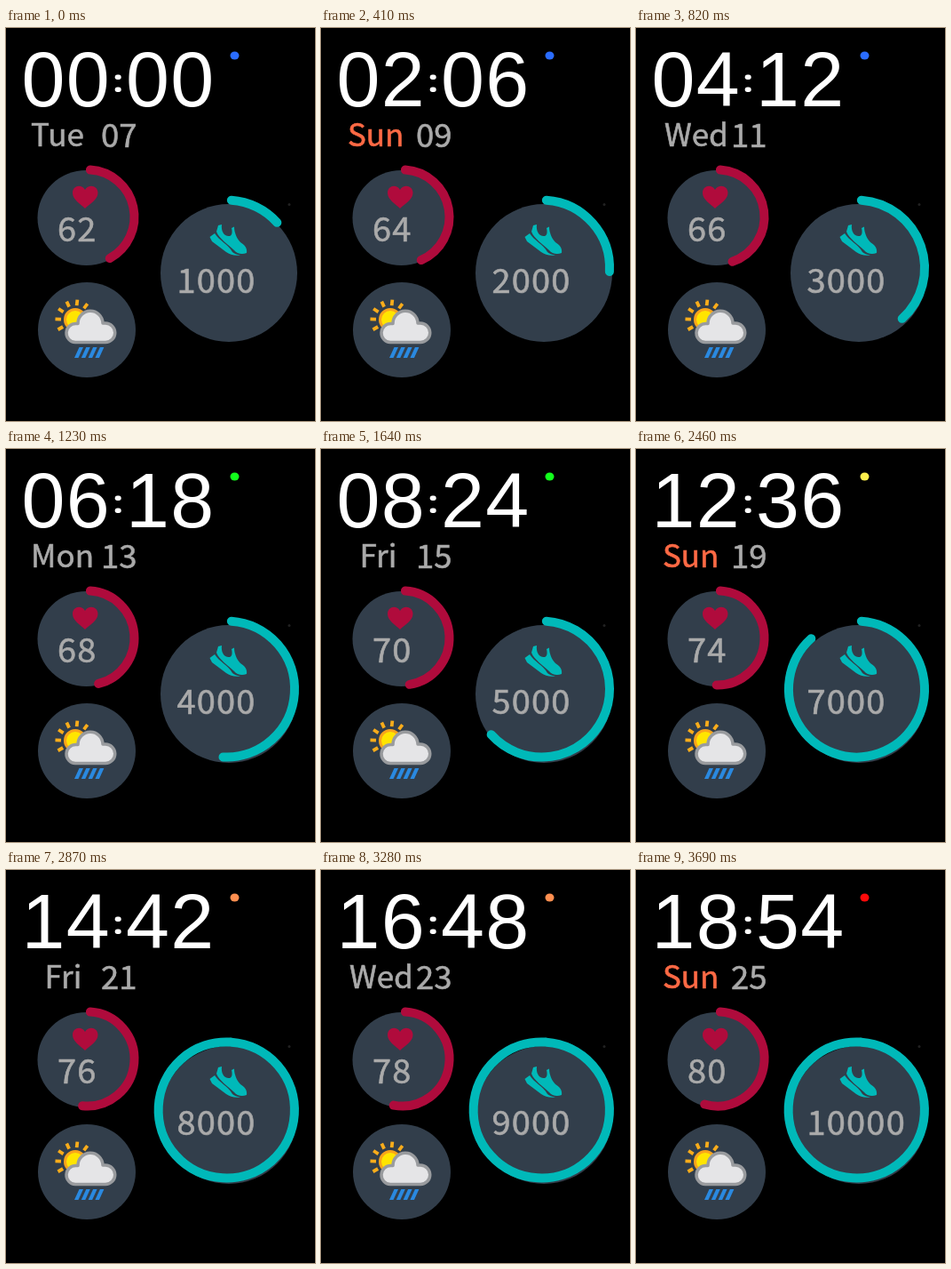
Recreate the animation shown at these times as an HTML page. Size 348x442 px, loop 4.1 s.

```html
<!DOCTYPE html>
<html lang="en">
<head>
<meta charset="utf-8">
<title>Watch face</title>
<style>
  html, body { margin: 0; width: 100%; height: 100%; overflow: hidden; background: #000; }
  svg { display: block; width: 348px; height: 442px; }
  text {
    font-family: "Noto Sans CJK JP", "Noto Sans CJK SC", "Noto Sans CJK", sans-serif;
    fill: #aaa; stroke: currentColor; stroke-width: .6; color: #aaa;
  }
  .time {
    font: 88px "Liberation Sans", Arial, sans-serif;
    letter-spacing: 1.2px; fill: #fff; stroke: none;
  }
  .value { font-size: 38px; letter-spacing: 1.2px; }
  .date { font-size: 36.5px; }
  #day { font-size: 35px; fill: currentColor; }
  .disc { fill: #323e4b; }
  .arc { fill: none; stroke-width: 10; stroke-linecap: round; }
</style>
</head>
<body>
<svg viewBox="0 0 348 442">
  <text id="hour" class="time" x="17.5" y="88"></text>
  <g fill="#fff">
    <rect x="122.7" y="52.5" width="7" height="5.500" rx="2.7"/>
    <rect x="122.7" y="66.500" width="7" height="5.500" rx="2.7"/>
  </g>
  <text id="minute" class="time" x="135" y="88"></text>
  <ellipse id="dot" cx="257.5" cy="31" rx="5" ry="4.5"/>
  <text id="day" y="133"></text>
  <text id="date" class="date" x="107" y="133.500"></text>
  <circle cx="319" cy="198.500" r="1.500" fill="#222"/>

  <ellipse class="disc" cx="90.5" cy="213.500" rx="55" ry="53.500"/>
  <path id="pulseArc" class="arc" stroke="#af0b3c"/>
  <path fill="#b00b3c" d="M89 203C84 198 75 193 75 185.500C75 177 85 175 89 182C93 175 103.500 177 103.500 185.500C103.500 193 94 198 89 203Z"/>
  <text id="pulse" class="value" x="58" y="239.500"></text>

  <ellipse class="disc" cx="251" cy="275.500" rx="77" ry="77.500"/>
  <path id="stepArc" class="arc" stroke="#00b9b9"/>
  <g fill="#00b9b9">
    <path d="M239 222L243 221C242 229 246 235 252 234C255 233 255 229 254 225L257 223.500C257 230 260 237 264 241C269 244 272 248 271 253C266 255 260 254 257 250C250 243 240 237 237 229Z"/>
    <path d="M229.500 235L235 231C240 239 250 243 255 252C257 254 260 255 264 255.500C258 256.500 252 255 248 252L232 240Z"/>
  </g>
  <text id="steps" class="value" x="192.500" y="297.500"></text>

  <ellipse class="disc" cx="91" cy="339.500" rx="55" ry="53.500"/>
  <g id="rays" stroke="#f9ac1b" stroke-width="3.800"></g>
  <circle cx="78" cy="328" r="11.500" fill="#ffe500" stroke="#f9a41b" stroke-width="3"/>
  <path fill="#e5e5e7" stroke="#999b9e" stroke-width="3.500" stroke-linejoin="round"
    d="M78 353.500A10.500 10.500 0 0 1 79 332.500L81 332.500A14 14 0 0 1 109 332L112 332A10.750 10.750 0 0 1 112 353.500Z"/>
  <g id="rain" fill="#2a89e0"></g>
</svg>
<script>
  const STEP = 410, COUNT = 10;
  const DAYS = ["Sun", "Mon", "Tue", "Wed", "Thu", "Fri", "Sat"];
  const DAY_X = [30, 28, 28, 32, 30, 43.5, 30];
  const el = id => document.getElementById(id);
  const pad = n => String(n).padStart(2, "0");

  // Angles in degrees, clockwise from the top
  function point(cx, cy, r, angle) {
    const a = angle * Math.PI / 180;
    return (cx + r * Math.sin(a)).toFixed(2) + " " + (cy - r * Math.cos(a)).toFixed(2);
  }

  function arc(cx, cy, r, from, to) {
    const mid = (from + to) / 2;
    const seg = a => `A${r} ${r} 0 0 1 ${point(cx, cy, r, a)}`;
    return `M${point(cx, cy, r, from)}${seg(mid)}${seg(to)}`;
  }

  function dotColor(i) {
    if (i < 3) return "#2a6cff";
    if (i < 5) return "#12ff1c";
    if (i < 7) return "#fff04d";
    return i < 9 ? "#ff8f50" : "#ff0a0a";
  }

  function show(i) {
    const date = new Date(2020, i, 7 + 2 * i);
    const weekday = date.getDay();
    el("hour").textContent = pad(2 * i);
    el("minute").textContent = pad(6 * i);
    el("dot").setAttribute("fill", dotColor(i));
    el("day").textContent = DAYS[weekday];
    el("day").setAttribute("x", DAY_X[weekday]);
    el("day").style.color = weekday % 6 ? "#aaa" : "#ff6a45";
    el("date").textContent = pad(date.getDate());
    el("pulse").textContent = 62 + 2 * i;
    el("pulseArc").setAttribute("d", arc(91.5, 212.5, 53, 3.7, 151.5 + 4.9 * i));
    el("steps").textContent = 1000 * (i + 1);
    const end = Math.min(3 + 45 * (i + 1), 363);
    el("stepArc").setAttribute("d", arc(248.5, 270, 76.5, 4, end));
  }

  for (let i = 0; i < 6; i++) {
    const a = 240 + 31.5 * i;
    el("rays").innerHTML += `<path d="M${point(78, 328, 16, a)}L${point(78, 328, 22.5, a)}"/>`;
  }
  for (let i = 0; i < 4; i++) {
    el("rain").innerHTML += `<path d="M${77 + 7.8 * i} 371l5.500-12h4.500l-5.500 12z"/>`;
  }

  let shown = -1;
  const start = performance.now();
  function tick() {
    const i = Math.floor((performance.now() - start) / STEP) % COUNT;
    if (i !== shown) show(shown = i);
    requestAnimationFrame(tick);
  }
  tick();
</script>
</body>
</html>
```
